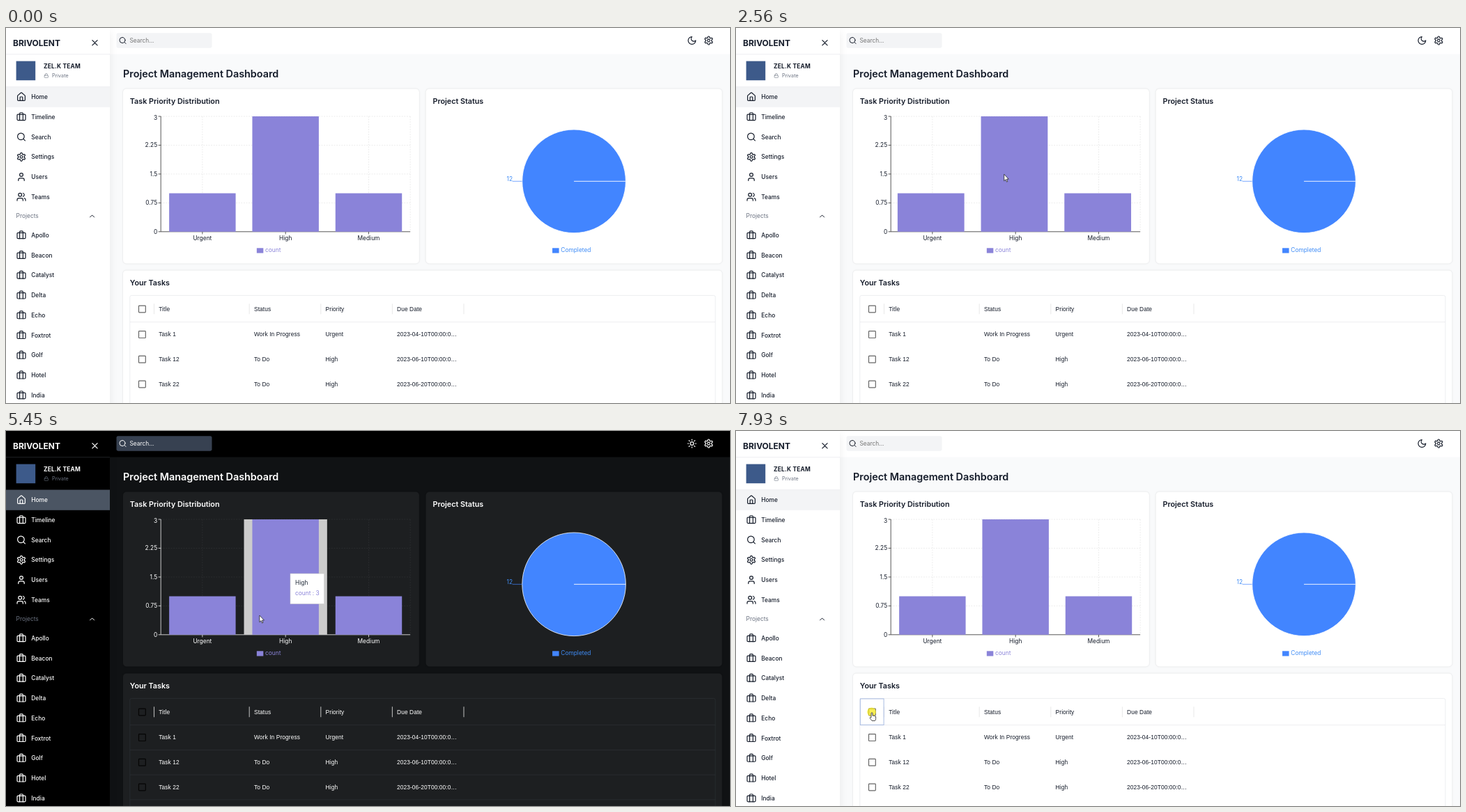
Write an HTML page that moves like this. It is 1039x539 px and loops after 8000 ms.

```html
<!DOCTYPE html>
<html lang="en">
<head>
<meta charset="utf-8">
<title>Project dashboard</title>
<style>
html, body { margin: 0; height: 100%; overflow: hidden; }
svg {
  display: block; width: 100%; height: 100%;
  font: 8.39px Inter, sans-serif; font-optical-sizing: none;
  --bg: #f9fafb; --panel: #fff; --card: #fff; --ink: #151c2a; --line: #e5e7eb;
  --grid: #dedede; --axis: #444; --sep: #e0e0e0; --sepW: .7; --box: #666; --row: transparent;
  --home: #f3f4f6; --field: #f3f4f6; --hint: #757575; --hover: #f3f4f6;
}
svg.dark {
  --bg: #101214; --panel: #000; --card: #1d1f21; --ink: #fff; --line: #2d3135;
  --grid: #35373a; --axis: #ddd; --sep: #b5b5b5; --sepW: 1.1; --box: #050505; --row: #2d3135;
  --home: #4b5563; --field: #374151; --hint: #fff; --hover: #374151;
}
text { fill: var(--ink); }
.icon { fill: none; stroke: var(--ink); stroke-width: 2; stroke-linecap: round; stroke-linejoin: round; }
.card { fill: var(--card); filter: drop-shadow(0 .6px .9px #0002); }
.side { fill: var(--panel); filter: drop-shadow(0 6px 6px #00000012); }
.line { fill: none; stroke: var(--line); stroke-width: .7; }
.grid { fill: none; stroke: var(--grid); stroke-width: .6; stroke-dasharray: 1.8; }
.axis { fill: none; stroke: var(--axis); stroke-width: .9; }
.sep { stroke: var(--sep); stroke-width: var(--sepW); }
.box { fill: none; stroke: var(--box); stroke-width: 1.2; }
.row { stroke: var(--row); stroke-width: .7; }
.table { font-family: "Liberation Sans", Arial, sans-serif; letter-spacing: .0107em; }
.muted text, .muted .icon { fill-opacity: 1; }
.dark .moon, svg:not(.dark) .sun { display: none; }
</style>
</head>
<body>
<svg id="stage" viewBox="0 0 1039 539" preserveAspectRatio="none"></svg>
<script>
const LOOP = 8000, FONT = 8.39, PURPLE = '#8a83d9', BLUE = '#4285ff', GRAY = '#6b7280';
const TOP = 127, BASE = 292.8;
const BARS = [['Urgent', 1], ['High', 3], ['Medium', 1]];

const rect = (x, y, w, h, attrs = '') => `<rect x="${x}" y="${y}" width="${w}" height="${h}" ${attrs}/>`;
const path = (d, attrs = '') => `<path d="${d}" ${attrs}/>`;
const circle = (x, y, r, attrs = '') => `<circle cx="${x}" cy="${y}" r="${r}" ${attrs}/>`;
// y is the middle of the capitals
const text = (x, y, s, size = FONT, weight = 400, attrs = '') =>
  `<text x="${x}" y="${y + size * .36}" font-size="${size}" font-weight="${weight}" ${attrs}>${s}</text>`;
const repeat = (n, f) => Array.from({ length: n }, (_, i) => f(i)).join('');

const TOOTH = 'M-3.2-6.1A2 2 0 0 0-2.2-7.8V-8A2 2 0 0 1-.2-10H.2A2 2 0 0 1 2.2-8V-7.8A2 2 0 0 0 3.2-6.1L3.7-5.8';
const ICONS = {
  home: path('M15 21v-8a1 1 0 0 0-1-1h-4a1 1 0 0 0-1 1v8M3 10a2 2 0 0 1 .7-1.5l7-6a2 2 0 0 1 2.6 0l7 6A2 2 0 0 1 21 10v9a2 2 0 0 1-2 2H5a2 2 0 0 1-2-2z'),
  case: path('M16 20V4a2 2 0 0 0-2-2h-4a2 2 0 0 0-2 2v16') + rect(2, 6, 20, 14, 'rx="2"'),
  search: circle(11, 11, 8) + path('m21 21-4.3-4.3'),
  gear: repeat(6, i => path(TOOTH, `transform="translate(12 12) rotate(${i * 60})"`)) + circle(12, 12, 3),
  user: path('M19 21v-2a4 4 0 0 0-4-4H9a4 4 0 0 0-4 4v2') + circle(12, 7, 4),
  users: path('M16 21v-2a4 4 0 0 0-4-4H6a4 4 0 0 0-4 4v2M22 21v-2a4 4 0 0 0-3-3.9M16 3.1a4 4 0 0 1 0 7.8') + circle(9, 7, 4),
  moon: path('M12 3a6 6 0 0 0 9 9 9 9 0 1 1-9-9Z'),
  sun: circle(12, 12, 4) + repeat(8, i => path('M0-10v2', `transform="translate(12 12) rotate(${i * 45})"`)),
  close: path('M18 6 6 18M6 6l12 12'),
  menu: path('M4 12h16M4 6h16M4 18h16'),
  up: path('m18 15-6-6-6 6'),
  lock: rect(3, 11, 18, 11, 'rx="2"') + path('M7 11V7a5 5 0 0 1 10 0v4')
};
const icon = (name, x, y, scale = .6, attrs = '') =>
  `<g class="icon ${name}" transform="translate(${x} ${y}) scale(${scale}) translate(-12 -12)" ${attrs}>${ICONS[name]}</g>`;

function layout(open) {
  const left = open ? 168 : 14.7, mid = (left + 1027.5) / 2, x = left + 54.2;
  return { left, mid, x, w: mid - 17.6 - x };
}

function sidebar() {
  const item = (name, label, y) => icon(name, 22, y) + text(36.3, y, label, FONT, 500);
  const pages = [['home', 'Home'], ['case', 'Timeline'], ['search', 'Search'], ['gear', 'Settings'], ['user', 'Users'], ['users', 'Teams']];
  const projects = ['Apollo', 'Beacon', 'Catalyst', 'Delta', 'Echo', 'Foxtrot', 'Golf', 'Hotel', 'India'];
  return rect(0, 0, 149, 539, 'class="side"') +
    text(10, 21.2, 'BRIVOLENT', 11.98, 700) + icon('close', 127.5, 21.2) +
    path('M0 37.7H149M0 84.5H149', 'class="line"') +
    rect(14.6, 47.6, 27.6, 27.6, 'fill="#3d5a8a"') +
    text(54, 55.2, 'ZEL.K TEAM', FONT, 700, 'letter-spacing=".025em"') +
    icon('lock', 57.8, 68.3, .3, `style="stroke:${GRAY}"`) +
    text(66, 68.4, 'Private', 7.19, 400, `style="fill:${GRAY}"`) +
    rect(0, 84.8, 149, 29, 'fill="var(--home)"') +
    pages.map(([name, label], i) => item(name, label, 99 + i * 28.76)).join('') +
    text(14.6, 270.4, 'Projects', FONT, 400, `style="fill:${GRAY}"`) + icon('up', 123.6, 270.4, .5) +
    projects.map((label, i) => item('case', label, 297.9 + i * 28.76)).join('');
}

function barChart({ left, mid, x, w }) {
  const band = w / 3, right = x + w, step = (BASE - TOP) / 4, center = (left + mid - 4.9) / 2;
  return repeat(4, i => path(`M${x} ${TOP + i * step}H${right}`, 'class="grid"')) +
    repeat(4, i => path(`M${i < 3 ? x + band * (i + .5) : right} ${TOP}V${BASE}`, 'class="grid"')) +
    path(`M${x} ${TOP}V${BASE}H${right}`, 'class="axis"') +
    repeat(5, i => path(`M${x} ${TOP + i * step}h-3.6`, 'class="axis"') +
      text(x - 5, TOP + i * step + (i ? 0 : 2.4), 3 - i * .75, FONT, 400, 'text-anchor="end"')) +
    BARS.map(([label], i) => path(`M${x + band * (i + .5)} ${BASE}v3.6`, 'class="axis"') +
      text(x + band * (i + .5), 301.6, label, FONT, 400, 'text-anchor="middle"')).join('') +
    rect(center - 20.6, 316.3, 9.5, 7.2, `fill="${PURPLE}"`) +
    text(center - 8.5, 319.4, 'count', FONT, 400, `style="fill:${PURPLE}"`);
}

function pieChart({ mid }) {
  const x = (mid + 1032.4) / 2, y = 220.3, ink = 'style="fill:#3f8cf6"';
  return circle(x, y, 74.3, `fill="${BLUE}" stroke="#fff" stroke-width=".8"`) +
    path(`M${x} ${y}h74.3`, 'stroke="#fff" stroke-width=".9"') +
    path(`M${x - 74.6} ${y}h-13.8`, `stroke="${BLUE}" stroke-width=".7"`) +
    text(x - 88, 217.2, '12', FONT, 400, ink + ' text-anchor="end"') +
    rect(x - 31, 316.3, 9.5, 7.2, `fill="${BLUE}"`) + text(x - 18.8, 319.4, 'Completed', FONT, 400, ink);
}

function table({ left }) {
  const cols = [51.2, 188, 290.6, 393], x = left + 9.8;
  const tasks = [
    ['Task 1', 'Work In Progress', 'Urgent', '2023-04-10T00:00:0…'],
    ['Task 12', 'To Do', 'High', '2023-06-10T00:00:0…'],
    ['Task 22', 'To Do', 'High', '2023-06-20T00:00:0…']
  ];
  const line = (cells, y) => rect(left + 22.5, y - 4.6, 9.8, 9.8, 'class="box" rx=".8"') +
    cells.map((s, i) => text(left + cols[i], y, s)).join('');
  return `<g class="table">` +
    rect(x, 384.4, 1018 - x, 170, 'class="line" rx="2.4"') + path(`M${x} 422.6H1018`, 'class="line"') +
    [44.5, 181.2, 283.8, 386.4, 489].map(c => path(`M${left + c} 396.3v15`, 'class="sep"')).join('') +
    line(['Title', 'Status', 'Priority', 'Due Date'], 403.7) +
    tasks.map((cells, i) => line(cells, 440.3 + i * 35.7) +
      path(`M${x} ${458.5 + i * 35.7}H1018`, 'class="row"')).join('') + '</g>';
}

function page(open) {
  const lay = layout(open), { left, mid } = lay, field = open ? 158.5 : 43.8;
  const card = (x, y, w, h, title) => rect(x, y, w, h, 'class="card" rx="4.8"') + text(x + 9.8, y + 17.6, title, 10.78, 600);
  return rect(0, 0, 1039, 37.5, 'fill="var(--panel)"') +
    (open ? sidebar() : icon('menu', 15, 18, .8)) +
    rect(field, 7.2, 137, 21.5, 'rx="2.4" fill="var(--field)"') + icon('search', field + 9, 18, .5) +
    text(field + 19, 18, 'Search...', FONT, 400, 'style="fill:var(--hint)"') +
    text(left, 66.2, 'Project Management Dashboard', 14.37, 600) +
    card(left, 87.5, mid - 4.9 - left, 251, 'Task Priority Distribution') + barChart(lay) +
    card(mid + 4.9, 87.5, 1022.6 - mid, 251, 'Project Status') + pieChart(lay) +
    card(left, 348.4, 1027.5 - left, 220, 'Your Tasks') + table(lay);
}

const stage = document.getElementById('stage');
stage.innerHTML = rect(0, 0, 1039, 539, 'fill="var(--bg)"') +
  `<g id="opened">${page(true)}</g><g id="closed">${page(false)}</g>` +
  rect(972.3, 6.3, 24, 24, 'id="hover" rx="3" fill="var(--hover)"') +
  icon('moon', 984.4, 18) + icon('sun', 984.4, 18) + icon('gear', 1008.4, 18) +
  rect(0, TOP, 0, BASE - TOP, 'id="band" fill="#ccc"') +
  `<g id="bars">${BARS.map(([, n]) => { const h = n * (BASE - TOP) / 3; return rect(0, BASE - h, 0, h, `fill="${PURPLE}"`); }).join('')}</g>` +
  `<g id="tip">${rect(0, 0, 48.6, 43.4, 'fill="#fff" stroke="#ccc" stroke-width=".6"')}` +
  text(7, 13, '', FONT, 400, 'style="fill:#1f2937"') + text(7, 27.8, '', FONT, 400, `style="fill:${PURPLE}"`) + '</g>' +
  rect(178.3, 384.9, 33.8, 37.5, 'id="focus" fill="none" stroke="#9fb4df" stroke-width=".9"') +
  `<g id="cursor" stroke="#222" stroke-width=".8" stroke-linejoin="round" fill="#fff">` +
  circle(-.4, -1.2, 6.4, 'id="press" stroke="none" fill="#f4e81c" opacity=".75"') +
  path('M0 0V9.6L2.2 7.6 3.7 11 5.1 10.4 3.7 7H6.6Z', 'id="arrow"') +
  path('M-1 6.5V.8Q-1-.2 0-.2T1 .8V4.2Q2 3.6 2.7 4.4 3.7 4 4.3 4.9 5.6 4.7 5.6 6V8.5Q5.6 10.5 4.5 11.5H0Q-1.5 9.5-3 7.3-2.6 5.6-1 7Z', 'id="hand"') + '</g>';

const el = id => document.getElementById(id);
const show = (id, on) => { el(id).style.display = on ? '' : 'none'; };
const within = (t, a, b) => t >= a && t < b;
const ease = u => { u = Math.max(0, Math.min(1, u)); return u * u * (3 - 2 * u); };

// Smooth path through [time, x, y] points, standing still between equal ones
function along(keys, t) {
  const last = keys.length - 1;
  if (t <= keys[0][0]) return keys[0].slice(1);
  if (t >= keys[last][0]) return keys[last].slice(1);
  const i = keys.findIndex(k => k[0] > t) - 1, a = keys[i], b = keys[i + 1];
  const same = (p, q) => p[1] === q[1] && p[2] === q[2];
  const slope = (j, c) => j < 1 || j >= last || same(keys[j], keys[j - 1]) || same(keys[j], keys[j + 1]) ? 0
    : (keys[j + 1][c] - keys[j - 1][c]) / (keys[j + 1][0] - keys[j - 1][0]);
  const d = b[0] - a[0], u = (t - a[0]) / d;
  return [1, 2].map(c => a[c] + (b[c] - a[c]) * ease(u) +
    d * u * (1 - u) * ((1 - u) * slope(i, c) - u * slope(i + 1, c)));
}

const POINTER = [
  [130, 892, 465], [900, 165, 49], [1110, 127, 21], [1450, 127, 21], [2000, 9.5, 17.5], [2280, 9.5, 17.5],
  [2600, 445, 222], [2910, 899, 90], [3200, 986, 20], [3620, 986, 20], [3730, 830, 130], [3940, 570, 251.5],
  [4200, 516, 261], [4570, 516, 261], [5110, 398, 258], [5310, 398, 258], [5450, 364, 265], [5900, 285, 272],
  [6060, 285, 272], [6210, 883.5, 74], [6550, 986, 20], [6990, 986, 20], [7730, 195, 405], [8000, 195, 405]
];
const TIP = [[4000, 458, 208], [4600, 458, 208], [5110, 408, 205], [5450, 408, 205], [5950, 295, 219.6], [6210, 295, 219.6]];
const HOVERS = [[4000, 4700, 2], [4700, 5530, 1], [5530, 6080, 0], [6080, 6280, 2]];
const PRESSES = [[1310, 1450], [2040, 2200], [3480, 3620], [6830, 6970], [7800, 8000]];
const CLOSE = 1380, REOPEN = 2190;

function draw(t) {
  const open = !within(t, CLOSE, REOPEN), [x, y] = along(POINTER, t);
  const near = (bx, by, r) => Math.abs(x - bx) < r && Math.abs(y - by) < r;
  stage.classList.toggle('dark', within(t, 3600, 6950));
  show('opened', open);
  show('closed', !open);

  const a = layout(true), b = layout(false), shift = ease((t - CLOSE) / 400) - ease((t - REOPEN) / 400);
  const px = a.x + (b.x - a.x) * shift, band = (a.w + (b.w - a.w) * shift) / 3;
  [...el('bars').children].forEach((bar, i) => {
    bar.setAttribute('x', px + band * (i + .1));
    bar.setAttribute('width', band * .8);
  });

  const hover = HOVERS.find(h => within(t, h[0], h[1]));
  show('band', hover);
  show('tip', hover);
  if (hover) {
    const [label, count] = BARS[hover[2]], [name, value] = el('tip').querySelectorAll('text');
    el('band').setAttribute('x', px + band * hover[2]);
    el('band').setAttribute('width', band);
    el('tip').setAttribute('transform', `translate(${along(TIP, t)})`);
    name.textContent = label;
    value.textContent = `count : ${count}`;
  }

  const onToggle = near(984.4, 18, 12);
  const hand = onToggle || near(195, 404, 9) || (open ? near(127.5, 21, 9) : near(15, 18, 12));
  show('hover', onToggle);
  show('focus', t >= 7800);
  show('cursor', t >= 130);
  show('press', PRESSES.some(p => within(t, ...p)));
  show('hand', hand);
  show('arrow', !hand);
  el('cursor').setAttribute('transform', `translate(${x} ${y})`);
}

const start = performance.now();
function tick() {
  draw((performance.now() - start) % LOOP);
  requestAnimationFrame(tick);
}
tick();
</script>
</body>
</html>
```
